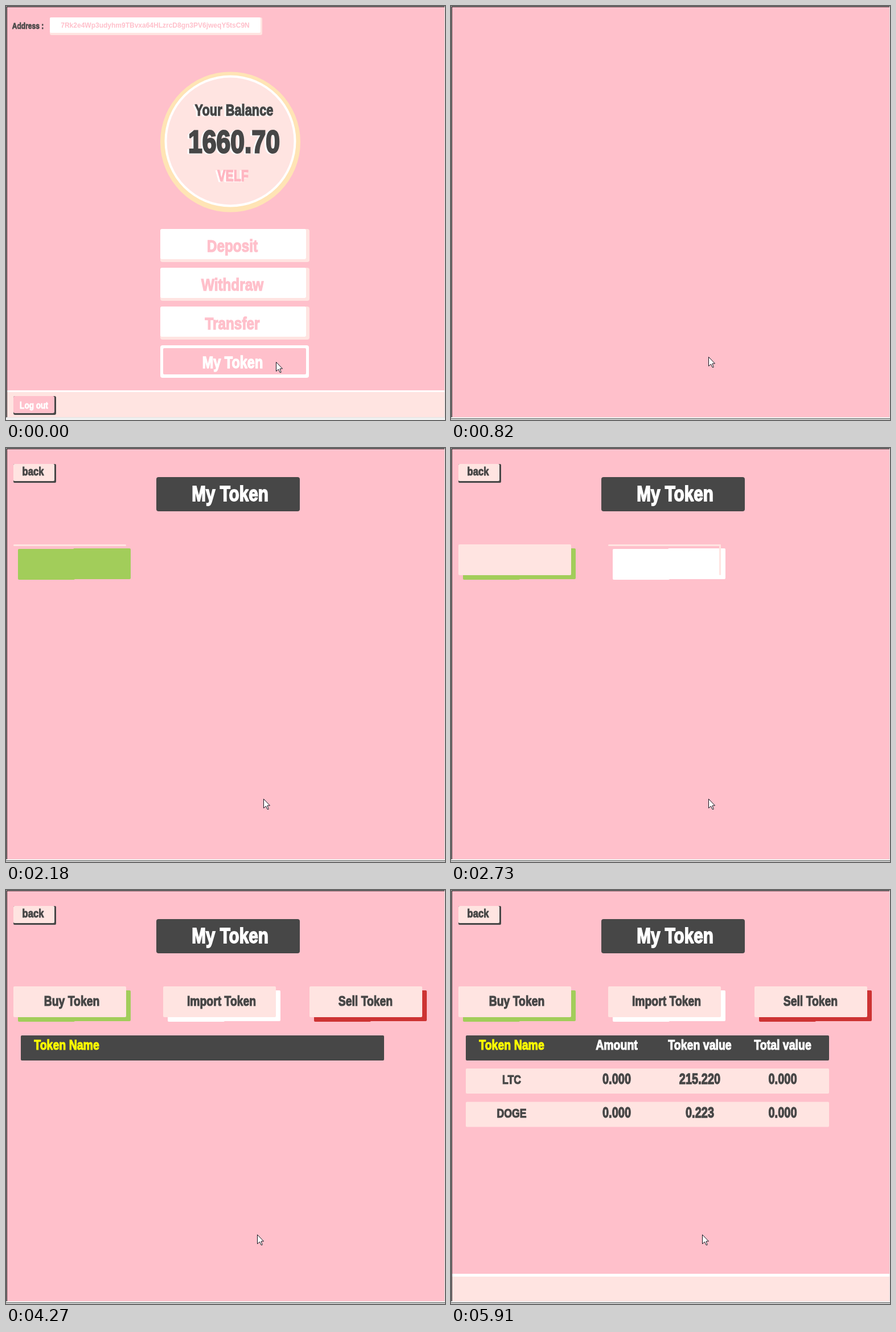
An HTML page with a canvas that plays this animation: 771 px wide and 726 px high, repeating every 6 s.

```html
<!DOCTYPE html>
<html lang="en">
<head>
<meta charset="utf-8">
<title>My Token</title>
<style>
  html, body { margin: 0; width: 100%; height: 100%; overflow: hidden; background: #ffc0cb; }
  canvas { display: block; }
</style>
</head>
<body>
<canvas id="stage" width="771" height="726"></canvas>
<script>
const ctx = document.getElementById('stage').getContext('2d');
const LOOP = 6000;
const TICKS_PER_MS = 0.011;
const PINK = '#ffc0cb', ROSE = '#ffe4e1', DARK = '#474747', WHITE = '#ffffff';
const FACE = '"Liberation Sans", Arial, sans-serif';
const CONDENSE = 0.8;

function rect(x, y, w, h, color) {
  ctx.fillStyle = color;
  ctx.fillRect(x, y, w, h);
}

function box(x, y, w, h, color, r = 4) {
  ctx.fillStyle = color;
  ctx.beginPath();
  ctx.roundRect(x, y, w, h, r);
  ctx.fill();
}

function disc(x, y, r, color) {
  ctx.fillStyle = color;
  ctx.beginPath();
  ctx.arc(x, y, r, 0, Math.PI * 2);
  ctx.fill();
}

// Heavy condensed display lettering, centred on x
function label(str, x, base, size, color) {
  const px = size * 1.03;
  ctx.save();
  ctx.translate(x, base - px * 0.025);
  ctx.scale(CONDENSE, 1);
  ctx.font = `bold ${px}px ${FACE}`;
  ctx.textAlign = 'center';
  ctx.fillStyle = ctx.strokeStyle = color;
  ctx.lineWidth = px * 0.05;
  ctx.miterLimit = 2;
  ctx.fillText(str, 0, 0);
  ctx.strokeText(str, 0, 0);
  ctx.restore();
}

function shadowLabel(str, x, base, size, color) {
  label(str, x - 3, base + 1, size, WHITE);
  label(str, x, base, size, color);
}

// Pen draws the top edge, then the right edge, then the shape is filled
function traced(k, [top, right, full], x, y, w, h, color, fill = box) {
  if (k >= full) return fill(x, y, w, h, color, 2);
  if (k >= top) box(x, y, w, 3, color, 1.5);
  if (k >= right) box(x + w - 3, y, 3, h, color, 1.5);
}

// Filled in two halves that sit one pixel apart
function splitBox(x, y, w, h, color) {
  box(x, y + 1, 100, h, color, 2);
  box(x + 97, y, w - 97, h, color, 2);
}

function frameEdges(home) {
  rect(0, 0, 771, 1, '#a0a0a0');
  rect(0, 0, 1, 722, '#a0a0a0');
  rect(1, 1, 770, 1, '#1c1416');
  rect(1, 1, 1, 720, '#1c1416');
  rect(770, 1, 1, 721, '#e3e3e3');
  rect(1, 721, 770, 1, '#e3e3e3');
  rect(0, 722, 771, 4, '#f0f0f0');
  if (!home) {
    rect(0, 722, 771, 1, WHITE);
    rect(0, 723, 771, 1, '#747474');
    rect(0, 724, 771, 1, '#a0a0a0');
  }
}

function menuButton(name, y) {
  box(271, y, 262, 58, ROSE);
  box(271, y, 256, 53, WHITE, 3);
  label(name, 397.5, y + 41, 29.5, PINK);
}

function homePage() {
  rect(0, 0, 771, 726, PINK);
  label('Address :', 38.5, 40, 14.6, DARK);
  box(77, 20, 373, 31, ROSE, 3);
  box(77, 20, 370, 27, WHITE, 2);
  ctx.font = `bold 12px ${FACE}`;
  ctx.textAlign = 'center';
  ctx.fillStyle = PINK;
  ctx.fillText('7Rk2e4Wp3udyhm9TBvxa64HLzrcD8gn3PV6jweqY5tsC9N', 262, 38);

  disc(394, 238.5, 123, '#ffe4b5');
  disc(394, 237, 115.5, WHITE);
  disc(394, 237, 111.5, ROSE);
  shadowLabel('Your Balance', 400.5, 193, 26.5, DARK);
  shadowLabel('1660.70', 400.5, 258, 54, DARK);
  shadowLabel('VELF', 398.5, 308, 26, '#ffb6c1');

  menuButton('Deposit', 391);
  menuButton('Withdraw', 459);
  menuButton('Transfer', 527);
  box(271, 595, 261, 57, WHITE);
  box(276, 600, 251, 46, PINK, 2);
  label('My Token', 398, 636, 28.5, WHITE);

  rect(2, 674, 768, 4, WHITE);
  rect(2, 677, 768, 44, ROSE);
  box(13, 684, 75, 33, DARK, 3);
  box(13, 684, 72, 30, PINK, 3);
  label('Log out', 49, 706, 16.5, WHITE);
}

const ACTIONS = [
  { name: 'Buy Token', x: 13, mid: 115.5, color: '#a2cd5a', under: [21, 22, 23], over: [24, 25, 26], text: 39 },
  { name: 'Import Token', x: 276, mid: 378.5, color: WHITE, under: [27, 28, 29], over: [30, 30, 31], text: 40 },
  { name: 'Sell Token', x: 533, mid: 631.5, color: '#cd3333', under: [33, 34, 35], over: [37, 37, 38], text: 41 }
];
const COLUMNS = [106.5, 291, 437, 582.5];
const HEADS = ['Token Name', 'Amount', 'Token value', 'Total value'];
const ROWS = [
  { y: 313, start: 53, text: 55, cells: ['LTC', '0.000', '215.220', '0.000'] },
  { y: 371.5, start: 60, text: 62, cells: ['DOGE', '0.000', '0.223', '0.000'] }
];

function tokenPage(k) {
  rect(0, 0, 771, 726, k < 9 ? WHITE : PINK);

  traced(k, [10, 11, 12], 13, 28, 75, 33, DARK);
  traced(k, [13, 14, 15], 13, 28, 72, 30, ROSE);
  if (k >= 16) label('back', 47.5, 49, 20.3, DARK);

  if (k >= 18) box(264, 51, 252, 60, DARK);
  if (k >= 20) label('My Token', 393.5, 94, 36, WHITE);

  for (const a of ACTIONS) {
    traced(k, a.under, a.x + 8, 176, 198, 54, a.color, splitBox);
    traced(k, a.over, a.x, 169, 198, 54, ROSE);
    if (k >= a.text) label(a.name, a.mid, 204, 23.5, DARK);
  }

  traced(k, [43, 44, 45], 26, 255, 638, 44, DARK);
  HEADS.forEach((head, i) => {
    if (k >= 47 + i) label(head, COLUMNS[i], 281, 23.7, i ? WHITE : '#ffff00');
  });

  if (k >= 51) rect(2, 673, 768, 6, WHITE);
  if (k >= 52) rect(2, 678, 768, 43, ROSE);

  for (const { y, start, text, cells } of ROWS) {
    traced(k, [start, start, start + 1], 26, y, 638, 44, ROSE);
    cells.forEach((cell, i) => {
      if (k >= text + i) label(cell, COLUMNS[i], y + 28, i ? 24.3 : 21.5, DARK);
    });
  }
}

// Pointer stops: tick, x, y
const PATH = [[0, 474, 624], [4, 452, 615], [36, 452, 615], [39, 448, 611], [42, 448, 611], [45, 441, 604], [66, 441, 604]];

function pointerAt(k) {
  const i = PATH.findIndex(p => p[0] > k);
  const [k0, x0, y0] = PATH[i - 1], [k1, x1, y1] = PATH[i];
  const u = (k - k0) / (k1 - k0);
  return [Math.round(x0 + (x1 - x0) * u), Math.round(y0 + (y1 - y0) * u)];
}

function pointer(k) {
  const [x, y] = pointerAt(k);
  ctx.save();
  ctx.translate(x + 0.5, y + 0.5);
  ctx.fillStyle = WHITE;
  ctx.strokeStyle = '#15151f';
  ctx.lineWidth = 1;
  ctx.fill(ARROW);
  ctx.stroke(ARROW);
  ctx.restore();
}
const ARROW = new Path2D('M0 0V16L4 12.5L6.5 18H8.5V17L6.5 11.5H11Z');

function draw() {
  const t = performance.now() % LOOP;
  const k = Math.min(65, Math.floor((t + 5) * TICKS_PER_MS));
  const home = k < 8;
  if (home) homePage();
  else tokenPage(k);
  frameEdges(home);
  pointer(k);
  requestAnimationFrame(draw);
}
draw();
</script>
</body>
</html>
```
